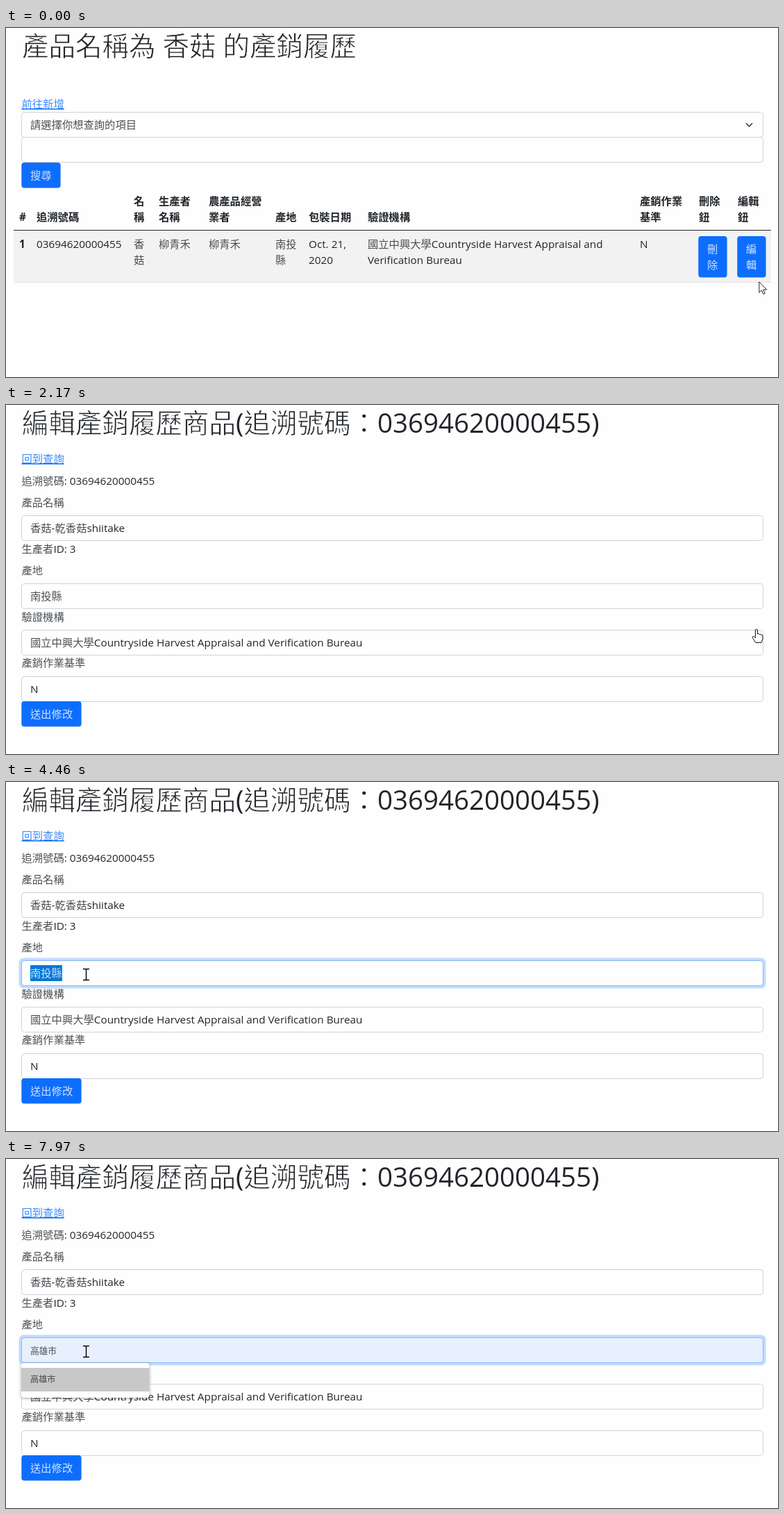
These frames come from a looping animation (1112x503 px, 8000 ms). An HTML page:

```html
<!DOCTYPE html>
<html lang="zh-Hant">
<head>
<meta charset="utf-8">
<style>
  html, body { margin: 0; width: 100%; height: 100%; overflow: hidden; background: #fefefe; }
  svg { display: block; width: 1112px; height: 503px; fill: #212529; white-space: pre;
    font: 15.3px "Open Sans", "Noto Sans CJK TC", sans-serif; }
  .han { fill-opacity: .8; }
  .title { font-size: 38.5px; }
  .title .han { fill-opacity: 1; stroke: #fefefe; stroke-width: .8; }
  .bold { font-weight: 700; }
  .bold .han { fill-opacity: 1; }
  .link { fill: #0d6efd; text-decoration: underline; }
  .white { fill: #fff; }
  .preview { font-size: 12.7px; }
  .option { font-size: 12.2px; }
  .button { fill: #0d6efd; }
  .box { fill: #fefefe; stroke: #ced4da; }
  .ring { fill: #c2dbfe; }
  .popup { fill: #fff; filter: drop-shadow(0 1px 2px rgba(0, 0, 0, .35)); }
</style>
</head>
<body>
<svg id="stage" viewBox="0 0 1112 503"></svg>
<script>
const LOOP = 8000;
const EM = 15.3;
const stage = document.getElementById('stage');

// Chinese runs get a lighter look than the Latin text
const text = (x, y, s, cls = '') => `<text x="${x}" y="${y}" class="${cls}">` +
  s.replace(/[\u3000-\u9fff\uff1a]+/g, '<tspan class="han">$&</tspan>') + '</text>';
const lines = (x, y, s, cls) => s.split('|').map((l, i) => text(x, y + i * 22.9, l, cls)).join('');
const rect = (x, y, w, h, attrs, r = 0) =>
  `<rect x="${x}" y="${y}" width="${w}" height="${h}" rx="${r}" ${attrs}/>`;
const button = (x, y, w, h, label, id = '') =>
  rect(x + .3, y, w + .3, h + .5, `class="button" id="${id}"`, 4) + lines(x + 13, y + 24, label, 'white');
const field = (y, s = '', id = '') =>
  rect(22.5, y + .5, 1068, 36, `class="box" id="${id}"`, 4) + text(35, y + 24, s);

const columns = [
  [19, '|#', '1'],
  [44, '|追溯號碼', '03694620000455'],
  [184, '名|稱', '香|菇'],
  [220, '生產者|名稱', '柳青禾'],
  [292, '農產品經營|業者', '柳青禾'],
  [388, '|產地', '南投|縣'],
  [436, '|包裝日期', 'Oct. 21,|2020'],
  [521, '|驗證機構', '國立中興大學Countryside Harvest Appraisal and|Verification Bureau'],
  [913, '產銷作業|基準', 'N'],
  [998, '刪除|鈕', ''],
  [1054, '編輯|鈕', '']
];

const listPage =
  text(23, 40, '產品名稱為 香菇 的產銷履歷', 'title') +
  text(22.5, 115, '前往新增', 'link') +
  field(121, '請選擇你想查詢的項目') +
  '<path d="M1066 137.3l4.5 4.5l4.5-4.5" fill="none" stroke="#343a40" stroke-width="1.6"/>' +
  field(157) +
  button(22, 194, 56, 36, '搜尋') +
  rect(11, 292, 1091, 74, 'fill="#f2f2f2"') +
  rect(11, 291, 1091, 1, 'fill="#212529"') +
  rect(11, 366, 1091, 1, 'fill="#dee2e6"') +
  columns.map(([x, head, cell], i) =>
    lines(x, 255, head, 'bold') + lines(x, 317, cell, i ? '' : 'bold')).join('') +
  button(997, 300, 41, 59, '刪|除') +
  rect(1049.5, 296.5, 48, 66, 'class="ring" id="editRing"', 7) +
  button(1053, 300, 41, 59, '編|輯', 'edit');

const editPage =
  text(23, 40, '編輯產銷履歷商品(追溯號碼：03694620000455)', 'title') +
  text(22.5, 83, '回到查詢', 'link') +
  text(22.5, 115, '追溯號碼: 03694620000455') +
  text(22.5, 146, '產品名稱') +
  field(159, '香菇-乾香菇shiitake') +
  text(22.5, 213, '生產者ID: 3') +
  text(22.5, 243.5, '產地') +
  text(22.5, 310.5, '驗證機構') +
  rect(18.5, 253.5, 1076, 44, 'class="ring" id="ring"', 7) +
  field(257, '', 'place') +
  '<g id="value"></g>' +
  field(324, '國立中興大學Countryside Harvest Appraisal and Verification Bureau') +
  text(22.5, 377, '產銷作業基準') +
  field(391, 'N') +
  button(22, 427, 86, 36, '送出修改') +
  '<g id="popup">' +
  rect(22, 294, 184.5, 50, 'class="popup"', 4) +
  rect(22, 301, 184.5, 34, 'fill="#c8c8c8" id="hilite"') +
  text(35, 321.5, '高雄市', 'option') + '</g>';

const cursors =
  '<g id="cursor">' +
  '<path id="arrow" d="M0 0V15.5L3.6 12L6 17.6L8.3 16.6L5.9 11.2H10.8Z" fill="#fff" stroke="#222"/>' +
  '<path id="hand" d="M-1.6 0Q0-1.8 1.6 0V6Q3.2 5 4.4 6.5Q6 5.7 7 7.3Q8.8 7 9 9V13L7 18.5H-1.2' +
  'L-5.6 11.5Q-6 9-3.6 9.6L-1.6 11.5Z" fill="#fff" stroke="#111"/>' +
  '<path id="beam" d="M-4.5-8H-1L0-7L1-8H4.5M0-7V7M-4.5 8H-1L0 7L1 8H4.5" ' +
  'fill="none" stroke="#000" stroke-width="1.4"/>' +
  '<circle id="press" cx="-.5" r="12" fill="#ff0" fill-opacity=".6"/></g>';

stage.innerHTML = `<g id="list">${listPage}</g><g id="form">${editPage}</g>${cursors}`;
const el = {};
stage.querySelectorAll('[id]').forEach(n => el[n.id] = n);
const show = (id, on) => el[id].style.display = on ? '' : 'none';

// time, x, y of the pointer's hot spot
const path = [
  [0, 1085, 366], [230, 1052, 352], [380, 1046, 312], [520, 1062, 274],
  [670, 1092, 290], [850, 1097, 340], [1000, 1098.5, 362], [1150, 1101, 361],
  [1300, 1098, 348], [1620, 1081, 324], [2200, 1081, 324], [2250, 1083, 333],
  [2480, 1083, 333], [2860, 872, 283.5], [3080, 480, 271], [3310, 125, 275],
  [3330, 125, 275], [3760, 48, 276], [3929, 48, 276], [3930, 36.5, 277.5],
  [4170, 36.5, 277.5], [4420, 115.5, 277.5], [LOOP, 115.5, 277.5]
];

function pointer(t) {
  const i = path.findIndex(p => p[0] > t);
  const [t0, x0, y0] = path[i - 1], [t1, x1, y1] = path[i];
  const k = (t - t0) / (t1 - t0);
  return [x0 + (x1 - x0) * k, y0 + (y1 - y0) * k];
}

function placeValue(t, x) {
  if (t >= 7970) return text(35, 280.5, '高雄市', 'preview');
  if (t >= 6160) {
    const typed = t < 6240 ? 'ㄍ' : t < 6390 ? 'ㄍㄠ' : '高';
    const end = 35 + typed.length * EM;
    const caretOn = t < 6870 || t >= 7420;
    return text(35, 281, typed) +
      (t < 7420 ? rect(35, 284, end - 35, 1, 'fill="#777"') : '') +
      (caretOn ? rect(Math.floor(end), 266, 1, 19, 'fill="#212529"') : '');
  }
  const word = '南投縣';
  const n = t < 4240 ? 0 : Math.max(0, Math.min(3, Math.round((x - 35) / EM)));
  return (n ? rect(35, 264, n * EM, 23, 'fill="#0078d7"') : '') +
    text(35, 281, word.slice(0, n), 'white') + text(35 + n * EM, 281, word.slice(n));
}

function render(t) {
  const [x, y] = pointer(t);
  const onList = t < 2160;
  const over = onList && x > 1053 && x < 1094 && y > 300 && y < 359;
  const clicked = t >= 2010;
  const focus = t >= 4240;
  const filled = t >= 7970;

  show('list', onList);
  show('form', !onList);
  show('editRing', clicked);
  el.edit.style.fill = clicked ? '#0a58ca' : over ? '#0b5ed7' : '';

  show('ring', focus);
  el.place.style.stroke = focus ? '#86b7fe' : '';
  el.place.style.fill = filled ? '#e8f0fe' : '';
  el.value.innerHTML = placeValue(t, x);
  show('popup', t >= 6390);
  show('hilite', filled);

  const beam = t >= 2200 && (y < 297 || y > 324);
  const hand = over || (t >= 2160 && t < 2200);
  show('beam', beam);
  show('hand', hand);
  show('arrow', !beam && !hand);
  show('press', (t >= 1940 && t < 2080) || (t >= 4170 && t < 4460));
  el.cursor.setAttribute('transform', `translate(${x} ${y})`);
}

function tick() {
  render(performance.now() % LOOP);
  requestAnimationFrame(tick);
}
tick();
</script>
</body>
</html>
```
